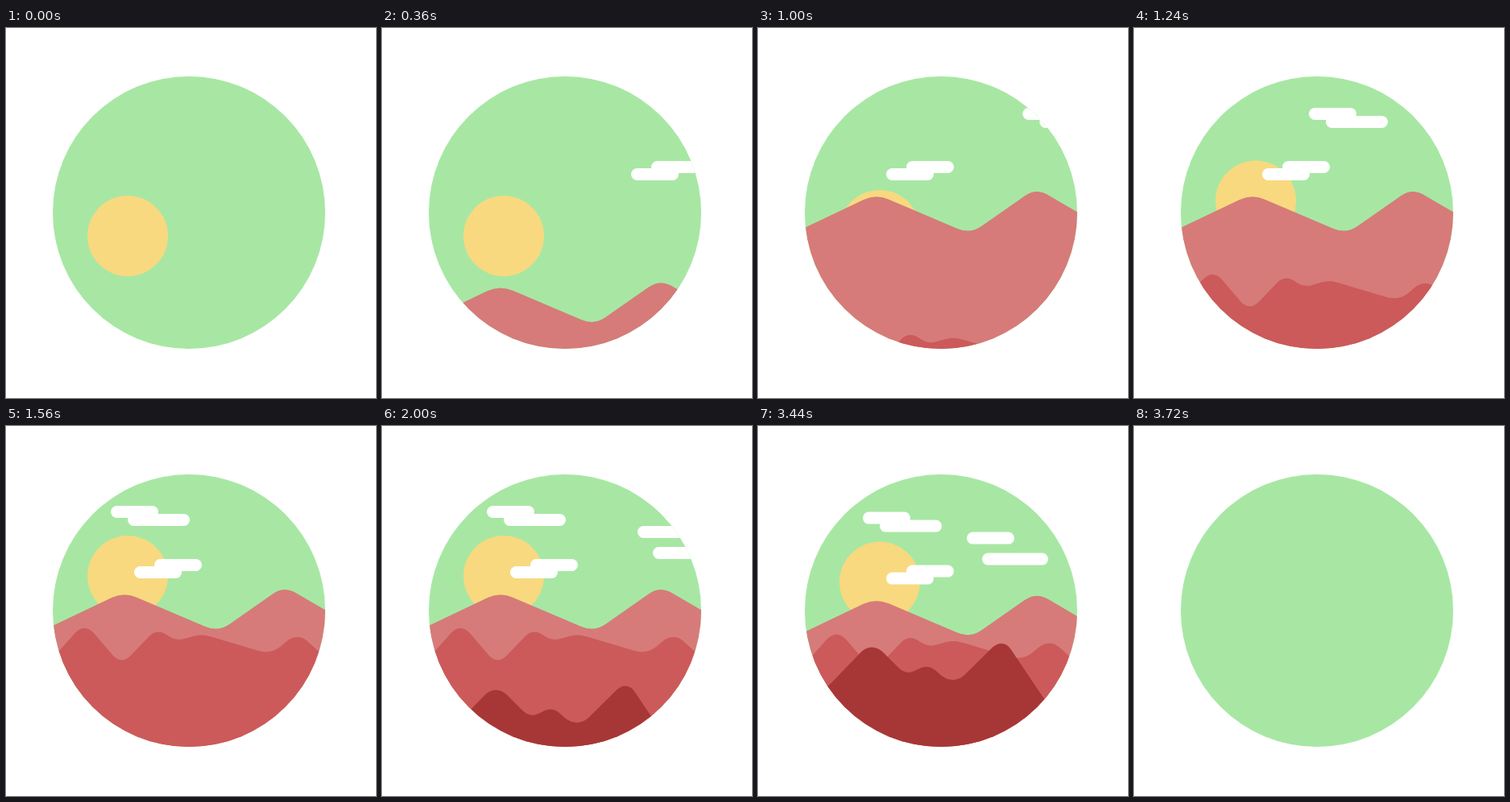
Recreate the animation shown at these times as an HTML page. Size 459 by 459 pixels, loop 3.84 s.

```html
<!DOCTYPE html>
<html lang="en">
<head>
<meta charset="utf-8">
<title>Mountain scene</title>
<style>
  html, body { margin: 0; width: 100%; height: 100%; overflow: hidden; background: #fff; }
  svg { display: block; width: 100%; height: 100%; }
</style>
</head>
<body>
<svg viewBox="0 0 459 459">
  <defs>
    <clipPath id="disc"><circle cx="227" cy="229" r="169"/></clipPath>
  </defs>
  <circle cx="227" cy="229" r="169" fill="#a7e7a3"/>
  <g clip-path="url(#disc)">
    <g id="scene">
      <circle id="sun" cx="151" cy="186" r="50" fill="#f8d97f"/>
      <path id="back" fill="#d67b79" d="M0,275.5 L131,213 Q147,205.6 163,213 L247,248.7 Q263.3,255.6 277,246
        L331,208.2 Q344.9,198.5 359.5,207 L459,265 V800 H0 Z"/>
      <path id="middle" fill="#cc5a5a" d="M0,354 L66,279 L85,257.5 Q97,244.5 109,257 L133,285 Q143.5,296 155,284.5
        L178,260.5 C185,253.5 193,254.5 200,259.5 C207,264.5 213,266 221,264 C232,261 240,256.8 255,261.5
        L312,278.5 C324,282 334,280 343,271.5 L347,268 C356,260 366,260 374,267 L459,344 V800 H0 Z"/>
      <path id="front" fill="#a73737" d="M0,405 L128,272.7 C136,264.8 147,265 155,273 L174,292
        C181,299 188,300 197,295 C206,289.5 213,290 220,295.5 L228,302.5 C237,309 247,309.5 256,301.5
        L291,267 C299,260 307,260.5 313,268.5 L358,335.5 L440,458 V800 H0 Z"/>
      <g fill="#fff">
        <g id="cloudLow">
          <rect x="184" y="165" width="59" height="15" rx="7.5"/>
          <rect x="159" y="174" width="59" height="15" rx="7.5"/>
        </g>
        <g id="cloudHigh">
          <rect x="130" y="99" width="59" height="15" rx="7.5"/>
          <rect x="151" y="109" width="77" height="15" rx="7.5"/>
        </g>
        <g id="cloudRight">
          <rect x="259" y="124" width="59" height="15" rx="7.5"/>
          <rect x="278" y="150" width="82" height="15" rx="7.5"/>
        </g>
      </g>
    </g>
  </g>
</svg>
<script>
  const LOOP = 3840, STEP = 40, ENTER = 720, EXIT = 360;

  // Each part enters from an offset that eases to zero.
  const parts = [
    { id: 'back', start: 40, dx: 0, dy: 187 },
    { id: 'cloudLow', start: 40, dx: 248, dy: 0 },
    { id: 'sun', start: 840, dx: 0, dy: 72 },
    { id: 'middle', start: 840, dx: 0, dy: 139 },
    { id: 'cloudHigh', start: 840, dx: 220, dy: 0 },
    { id: 'front', start: 1640, dx: 0, dy: 121 },
    { id: 'cloudRight', start: 1640, dx: 116, dy: 0 }
  ].map(p => ({ ...p, node: document.getElementById(p.id) }));
  const scene = document.getElementById('scene');

  function ease(t, start, duration) {
    const u = Math.min(1, Math.max(0, (t - start) / duration));
    return u < 0.5 ? 2 * u * u : 1 - 2 * (1 - u) * (1 - u);
  }

  function move(node, x, y) {
    node.setAttribute('transform', `translate(${x} ${y})`);
  }

  function draw(ms) {
    const t = Math.floor((ms % LOOP) / STEP) * STEP;
    for (const p of parts) {
      const rest = 1 - ease(t, p.start, ENTER);
      move(p.node, p.dx * rest, p.dy * rest);
    }
    move(scene, 0, 308 * ease(t, 3400, EXIT));
    scene.style.display = t >= 3720 ? 'none' : '';
  }

  const origin = performance.now();
  function tick() {
    draw(performance.now() - origin);
    requestAnimationFrame(tick);
  }
  tick();
</script>
</body>
</html>
```
